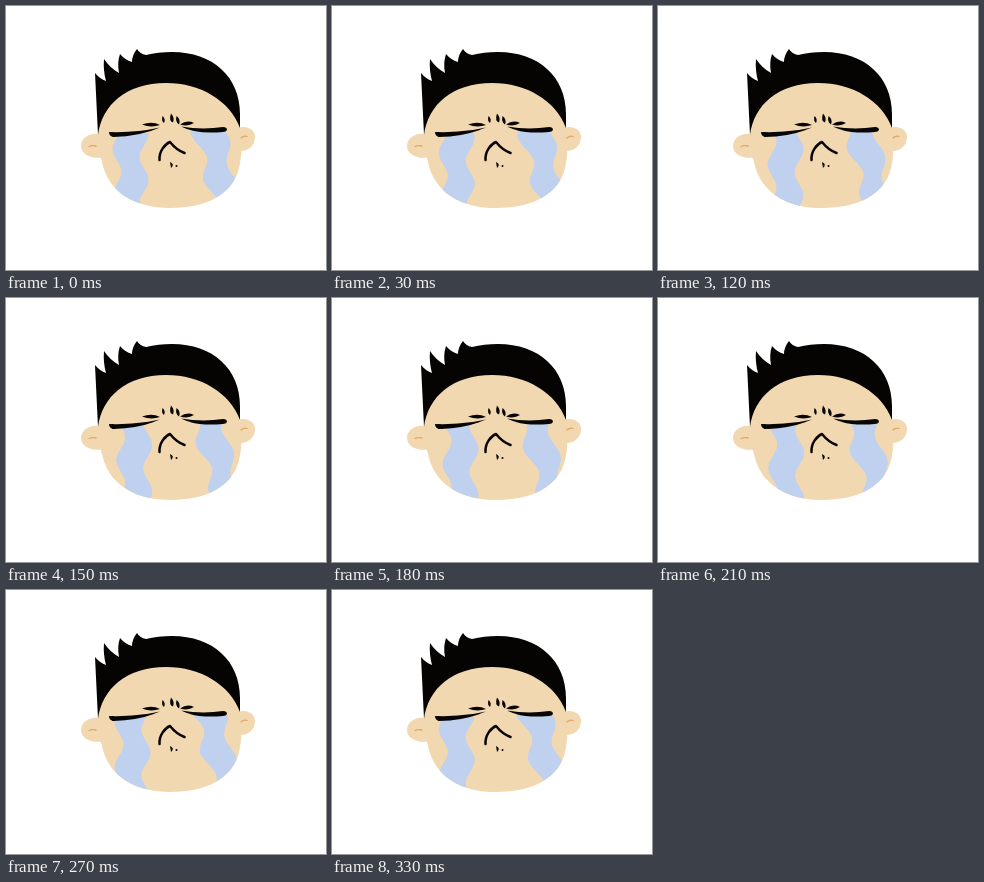
An HTML page that plays this animation: 320x264 px, repeating every 0.36 s.

```html
<!DOCTYPE html>
<html lang="en">
<head>
<meta charset="utf-8">
<title>Crying face</title>
<style>
html, body { margin: 0; width: 100%; height: 100%; overflow: hidden; background: #fff; }
svg { display: block; width: 320px; height: 264px; }
.skin { fill: #f2d8b0; }
.tears { fill: #bfd1ee; }
.line { fill: none; stroke: #080604; stroke-linecap: round; stroke-linejoin: round; }
.fold { fill: none; stroke: #e3a75f; stroke-width: 1.3; stroke-linecap: round; }
</style>
</head>
<body>
<svg viewBox="0 0 320 264">
  <defs>
    <path id="head" d="M92 126C93 98 118 72 160 72C202 72 229 96 234 121C236 137 236 150 233 162C227 188 201 202 164 202C128 202 104 186 97 160C94 150 92 138 92 126Z"/>
    <clipPath id="face"><use href="#head"/></clipPath>
  </defs>

  <g class="skin">
    <path d="M96 129C86 125 75 131 75 140C75 149 87 154 98 151Z"/>
    <path d="M232 122C241 119 249 124 249 131C249 139 243 145 234 145Z"/>
    <use href="#head"/>
  </g>
  <path class="fold" d="M83 140.5Q86 139 90 140M235 132Q238 129.5 241 130.5"/>

  <g class="tears" clip-path="url(#face)">
    <path id="left"/>
    <path id="right"/>
  </g>

  <path fill="#050403" d="M92 129L89 67Q94 73 100 75Q97 64 98 53Q104 62 113 67Q111 57 114 48Q119 54 126 56Q126 49 131 43Q134 48 140 49Q152 46 166 46C207 46 234 71 234 108V122C224 95 195 77 160 77C120 77 96 99 92 129Z"/>

  <g fill="#080604">
    <path d="M103 126Q129 127 154 121.5Q134 130.5 107 131Q103 130 103 126Z"/>
    <path d="M175 120.5Q196 124 217 121Q221 121 221 124Q220 126 217 126Q190 128.5 175 120.5Z"/>
    <path d="M136 118.5Q146 115 154 119Q145 122 136 118.5Z"/>
    <path d="M174 118.5Q181 113.5 188 117Q182 121 174 118.5Z"/>
    <path d="M156.5 110Q160 113 158 117Q155 115 156.5 110Z"/>
    <path d="M165 107.5Q169 112 167 116.5Q162.5 115 165 107.5Z"/>
    <path d="M170.5 110Q175 113 173 118.5Q169 116 170.5 110Z"/>
    <path d="M164 156Q169 158 165 162Z"/>
    <circle cx="170.5" cy="160" r="1"/>
  </g>
  <path class="line" stroke-width="2.5" d="M153.5 154C153 145 159 138 164 136C168 141 173 145 178.5 147"/>
</svg>
<script>
const LOOP = 360, STEP = 30, WAVE = 46, TOP = 127, BOTTOM = 205;

// Each edge: x at the top, slope, ripple size, ripple offset
const streams = [
  { id: 'left', sway: 2, top: [130, 127], edges: [[113, 0, 4.5, -8], [140, 0, 4.5, 0]] },
  { id: 'right', sway: 0, top: [124, 125], edges: [[189.5, 0.27, -5, 0], [218.5, 0.2, -4, -16]] }
];

function edge([x, slope, size, offset], top, crest, shift) {
  const points = [];
  for (let y = top; y <= BOTTOM; y += 3) {
    const ripple = size * Math.cos(2 * Math.PI * (y - crest - offset) / WAVE);
    points.push((x + shift + slope * (y - TOP) + ripple).toFixed(2) + ' ' + y);
  }
  return points;
}

function draw(now) {
  const phase = Math.floor(now % LOOP / STEP) * STEP / LOOP;
  const crest = 128 + WAVE * phase;
  for (const { id, sway, top, edges } of streams) {
    const shift = -sway * Math.cos(2 * Math.PI * phase);
    const [a, b] = edges.map((e, i) => edge(e, top[i], crest, shift));
    document.getElementById(id).setAttribute('d', 'M' + a.concat(b.reverse()).join('L') + 'Z');
  }
}

const start = performance.now();
function tick() {
  draw(performance.now() - start);
  requestAnimationFrame(tick);
}
tick();
</script>
</body>
</html>
```
